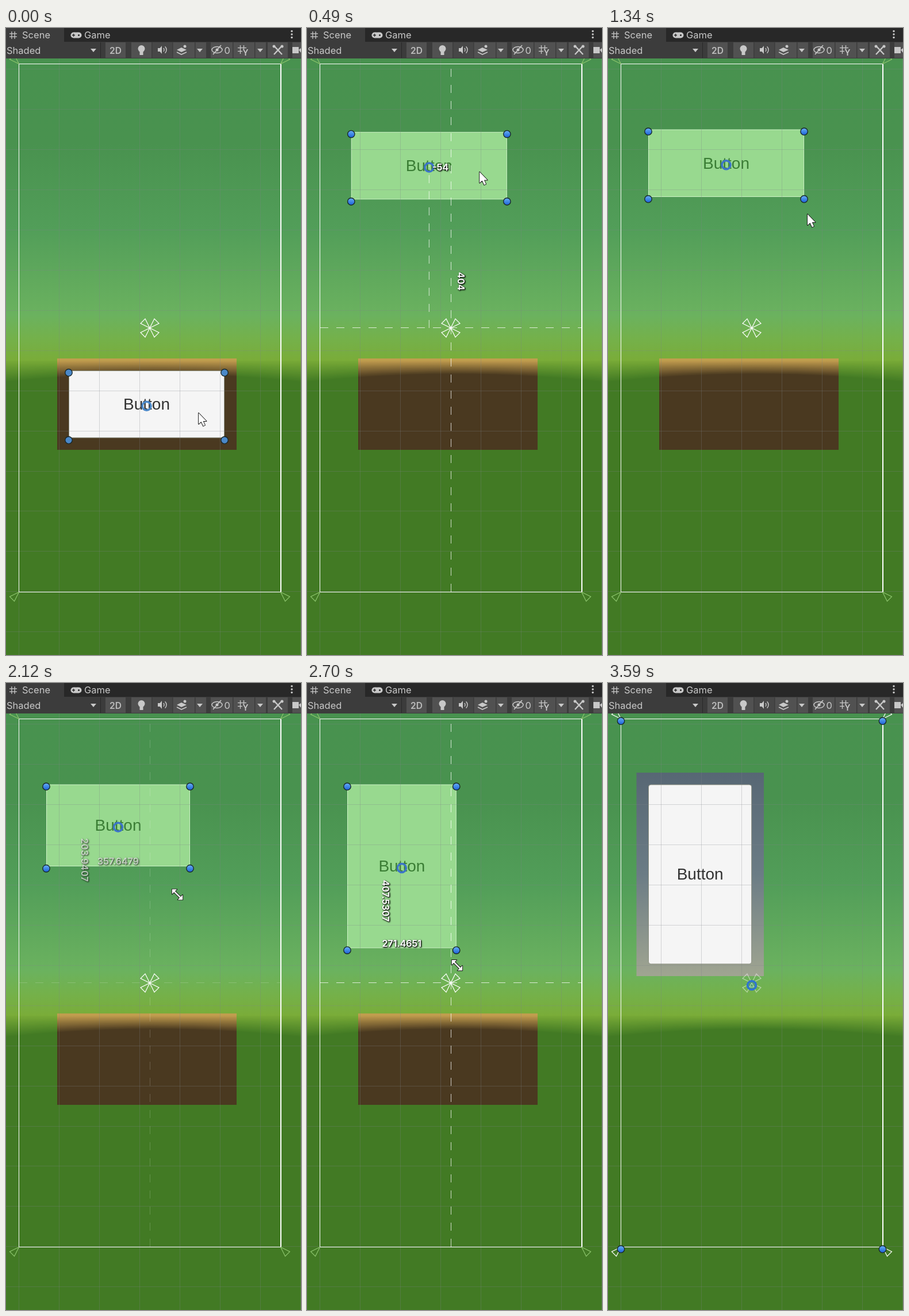
An HTML page with a canvas for the animation above (3900 ms loop, 513 by 1091 pixels).

```html
<!DOCTYPE html>
<html>
<head>
<meta charset="utf-8">
<style>
html, body { margin: 0; width: 100%; height: 100%; overflow: hidden; background: #427a24; }
canvas { display: block; }
</style>
</head>
<body>
<canvas id="stage" width="513" height="1091"></canvas>
<script>
const g = document.getElementById('stage').getContext('2d');
const LOOP = 3900, UNIT = 0.699, CX = 250, CY = 522;
const DROP = 1500, DESELECT = 3430, RELEASE = 3590;
const FRAME = { x: 22.5, y: 62.5, w: 455, h: 919 };
const UI = 'Inter, sans-serif', INK = '#c8c8c8', KEY = '#515151';
const SIDES = [-1, 1];

// Resize drag and pointer route: [time, x, y]
const sizes = [[1980, 387.8, 168], [2120, 357.6479, 203.9407], [2460, 293.7151, 345.7917], [3000, 257.81, 447.6847]];
const route = [[700, 296, 250], [1340, 347, 324], [1980, 347, 322], [2120, 298, 368],
  [2460, 271, 444], [2950, 256, 518], [3030, 256, 518], [3140, 393, 430], [3400, 470, -30]];

const mix = (a, b, k) => a + (b - a) * k;
const ramp = (t, a, b) => Math.min(1, Math.max(0, (t - a) / (b - a)));
const ease = (t, a, b) => { const k = ramp(t, a, b); return k * k * (3 - 2 * k); };

// Monotone cubic curve through the key points
function along(keys, t) {
  const last = keys.length - 1;
  if (t <= keys[0][0]) return keys[0].slice(1);
  if (t >= keys[last][0]) return keys[last].slice(1);
  const i = keys.findIndex(k => k[0] > t) - 1;
  const slope = (n, c) => (keys[n + 1][c] - keys[n][c]) / (keys[n + 1][0] - keys[n][0]);
  const tangent = (n, c) => {
    if (n === 0 || n === last) return 0;
    const a = slope(n - 1, c), b = slope(n, c);
    return a * b > 0 ? 2 * a * b / (a + b) : 0;
  };
  const d = keys[i + 1][0] - keys[i][0], u = (t - keys[i][0]) / d, v = 1 - u;
  return [1, 2].map(c => mix(keys[i][c], keys[i + 1][c], u * u * (3 - 2 * u)) +
    u * v * d * (v * tangent(i, c) - u * tangent(i + 1, c)));
}

const buttonPos = t => [mix(109, 70, ease(t, 20, 660)), mix(596, 176.5, ease(t, 20, 520))];

function pointer(t) {
  if (t >= 700) return along(route, t);
  const [x, y] = buttonPos(t < 20 ? 0 : t + 40);
  return [x + 226, y + 74];
}

const guideAlpha = t => ramp(t, 20, 250) - ramp(t, 800, 1050) + ramp(t, 2010, 2240) - ramp(t, 3030, 3250);

function box(x, y, w, h, fill) {
  g.fillStyle = fill;
  g.fillRect(x, y, w, h);
}

function trace(points) {
  g.beginPath();
  for (let i = 0; i < points.length; i += 2) g.lineTo(points[i], points[i + 1]);
}

function line(points, color, width = 1) {
  trace(points);
  g.strokeStyle = color;
  g.lineWidth = width;
  g.stroke();
}

function shape(points, fill) {
  trace(points);
  g.fillStyle = fill;
  g.fill();
}

function disc(x, y, r, fill, stroke, width = 1, span = Math.PI) {
  g.beginPath();
  g.arc(x, y, r, -span, span);
  if (fill) { g.fillStyle = fill; g.fill(); }
  if (stroke) { g.strokeStyle = stroke; g.lineWidth = width; g.stroke(); }
}

function text(s, x, y, color = INK, align = 'left', font = '16.5px ' + UI) {
  g.font = font;
  g.fillStyle = color;
  g.textAlign = align;
  g.fillText(s, x, y);
}

function gradient(y0, y1, ...colors) {
  const grad = g.createLinearGradient(0, y0, 0, y1);
  colors.forEach((c, i) => grad.addColorStop(i / (colors.length - 1), c));
  return grad;
}

// Curved bands that darken from the horizon into flat ground
function horizon(from, to) {
  for (let i = 0; i <= 14; i++) {
    const k = i / 14, edge = 579 + 36 * k, mid = 579 + 9 * k;
    g.fillStyle = `rgb(${from.map((c, n) => Math.round(mix(c, to[n], k)))})`;
    g.beginPath();
    g.moveTo(0, edge);
    g.quadraticCurveTo(256, mid, 513, edge);
    g.lineTo(513, 1091);
    g.lineTo(0, 1091);
    g.fill();
  }
}

function backdrop() {
  box(0, 52, 513, 448, gradient(52, 500, '#48924f', '#49924f', '#529e59', '#6bb25f'));
  box(0, 500, 513, 80, gradient(500, 580, '#6bb25f', '#74b14b', '#7aac38'));
  horizon([118, 168, 54], [66, 122, 36]);
}

function panel(moved) {
  if (moved) {
    box(49.5, 156, 221.5, 354, gradient(156, 510, '#576774', '#6b7c85', '#a0a591'));
    return;
  }
  g.save();
  g.beginPath();
  g.rect(89, 575, 312, 159);
  g.clip();
  box(89, 575, 312, 159, '#c09e4e');
  horizon([188, 152, 76], [74, 57, 32]);
  g.restore();
}

function grid() {
  const tint = 'rgba(125,130,135,.3)';
  for (let x = 22; x < 513; x += 70) box(x, 52, 1, 1039, tint);
  for (let y = 71; y < 1091; y += 69.95) box(0, Math.round(y), 513, 1, tint);
}

function handles({ x, y, w, h }, flat) {
  for (const hx of [x, x + w]) for (const hy of [y + 3.7, y + h + 3.7])
    disc(hx, hy, 6.2, flat ? '#4b88c8' : gradient(hy - 6, hy + 6, '#68b0f4', '#1c62d8'), '#18282c', 1.4);
}

function button({ x, y, w, h }, solid) {
  g.beginPath();
  g.roundRect(x + 0.5, y + 0.5, w - 1, h - 1, solid ? 4 : 0);
  g.fillStyle = solid ? '#f5f5f5' : '#98d98f';
  g.fill();
  g.strokeStyle = solid ? '#8b8f80' : '#cdf3c6';
  g.lineWidth = 1;
  g.stroke();
  text('Button', x + w / 2, y + h / 2 + 9.5, solid ? '#323232' : '#3a7d34', 'center',
    '28px "Liberation Sans", Arial, sans-serif');
}

function canvasFrame(selected) {
  const { x, y, w, h } = FRAME;
  g.strokeStyle = '#fff';
  g.lineWidth = 1;
  g.strokeRect(x, y, w, h);
  box(x + w, y, 1.5, h, '#fff');
  // Corner and anchor marks share one wedge
  const wedge = (px, py, sx, sy, tint) =>
    line([px, py, px + 16 * sx, py + 8 * sy, px + 8 * sx, py + 16 * sy, px, py], tint, 1.2);
  for (const sx of SIDES) for (const sy of SIDES) {
    wedge(x + (sx + 1) / 2 * w, y + (sy + 1) / 2 * h, sx, sy, selected ? '#fff' : '#8cc46c');
    wedge(CX, CY, sx, sy, selected ? 'rgba(255,255,255,.5)' : '#fff');
  }
}

function label(s, x, y, upright) {
  g.save();
  g.translate(x, y);
  if (upright) g.rotate(Math.PI / 2);
  g.shadowColor = '#000';
  g.shadowBlur = 2.5;
  g.shadowOffsetX = g.shadowOffsetY = 1;
  for (let i = 0; i < 2; i++) text(s, 0, 5.7, '#fff', 'center', '600 16px ' + UI);
  g.restore();
}

function guides(alpha, dragging, { x, y, w, h }, size) {
  const mx = x + w / 2, my = y + h / 2, dash = 'rgba(255,255,255,.75)';
  g.globalAlpha = alpha * alpha;
  g.setLineDash([14, 14]);
  line([CX + 0.5, 981, CX + 0.5, 63], dash);
  line([23, CY - 0.5, 477, CY - 0.5], dash);
  if (dragging) line([mx, CY, mx, my], dash);
  g.setLineDash([]);
  g.globalAlpha = alpha;
  if (dragging) {
    label(Math.round((mx - 250.3) / UNIT), (mx + CX) / 2 + 1, my + 3);
    label(Math.floor((CY - my) / UNIT), CX + 18, (my + CY) / 2 + 60, true);
  } else {
    const [across, down] = size.map(v => +v.toFixed(4));
    label(across, mx, y + h - 8.5);
    label(down, 137, my + 60, true);
  }
  g.globalAlpha = 1;
}

function cursor(x, y, resizing) {
  g.save();
  g.translate(x, y);
  g.lineJoin = 'round';
  if (resizing) g.rotate(Math.PI / 4);
  const outline = resizing
    ? SIDES.flatMap(s => [-13 * s, 0, -7 * s, -6 * s, -7 * s, -1.3 * s, 7 * s, -1.3 * s, 7 * s, -6 * s])
    : [0, 0, 0, 19, 4.5, 15, 8, 22.5, 11, 21, 7.8, 14, 13.5, 14];
  trace(outline);
  g.closePath();
  g.strokeStyle = '#111';
  g.lineWidth = 1.8;
  g.stroke();
  shape(outline, '#fff');
  g.restore();
}

function caret(x) {
  shape([x - 5, 36, x + 5, 36, x, 42], INK);
}

function hash(x, y, s) {
  for (const d of [s * 0.3, s * 0.7]) {
    line([x + d, y, x + d, y + s], INK, 1.3);
    line([x, y + d, x + s, y + d], INK, 1.3);
  }
}

function tabs() {
  box(0, 0, 513, 53, '#3c3c3c');
  box(101, 0, 412, 24, '#282828');
  hash(6, 6, 13);
  text('Scene', 28, 17.5);
  text('Game', 136, 17.5);
  line([118, 12.5, 126, 12.5], INK, 10);
  for (const s of SIDES) disc(122 + 4.5 * s, 12.5, 5, INK);
  line([115, 12.5, 120, 12.5], '#282828', 1.4);
  line([117.5, 10, 117.5, 15], '#282828', 1.4);
  disc(126.5, 12.5, 1.5, '#282828');
  for (let i = -1; i <= 1; i++) disc(497, 11 + 5.5 * i, 1.7, INK);
}

function tools() {
  text('Shaded', 1, 44.5);
  caret(152);
  box(164, 25, 1, 27, '#282828');
  box(173, 25, 35, 27, KEY);
  text('2D', 190.5, 44.5, '#bcbcbc', 'center', '600 15.5px ' + UI);

  box(218, 25, 272, 27, KEY);
  box(254, 25, 35, 27, '#474747');
  for (const x of [253, 289, 328, 394, 432]) box(x, 25, 1.5, 27, '#3c3c3c');
  box(348, 25, 8, 27, '#3c3c3c');
  box(452, 25, 3, 27, '#3c3c3c');
  box(498, 25, 15, 27, KEY);
  // Light bulb
  disc(235.5, 36, 6, INK);
  box(232.5, 40, 6, 7, INK);
  // Speaker
  box(264, 35, 4, 6, INK);
  shape([265, 38, 271, 31, 271, 45], INK);
  for (const r of [4, 8]) disc(271, 38, r, null, INK, 1.5, 0.8);
  // Layers with a sparkle
  shape([297, 38, 305, 34, 314, 38, 305, 42], INK);
  line([297, 42, 305, 46, 314, 42], INK, 1.7);
  disc(311, 32, 2.5, INK);
  caret(337);
  // Crossed eye
  g.beginPath();
  g.ellipse(367, 38, 9, 5.5, 0, 0, 7);
  g.strokeStyle = INK;
  g.lineWidth = 1.5;
  g.stroke();
  disc(367, 38, 2.5, INK);
  line([360, 46, 374, 30], INK, 1.6);
  text('0', 379.5, 44.5);
  // Grid axis
  hash(403, 30, 15);
  box(411, 37, 11, 11, KEY);
  text('Y', 416.5, 48, INK, 'center', '600 14px ' + UI);
  caret(442);
  // Crossed tools and camera
  for (const s of SIDES) {
    line([473 - 7 * s, 31, 473 + 7 * s, 46], INK, 2.4);
    disc(473 + 7 * s, 32, 2.5, INK);
  }
  box(498, 33, 11, 11, INK);
  shape([509, 38, 513, 35, 513, 43], INK);
}

function draw(t) {
  const moved = t >= RELEASE, solid = t < 20 || moved;
  const [x, y] = buttonPos(t), size = along(sizes, t), [w, h] = size.map(v => v * UNIT);
  const rect = { x, y, w, h }, alpha = guideAlpha(t);
  backdrop();
  panel(moved);
  button(rect, solid);
  grid();
  canvasFrame(t >= DESELECT);
  if (t < DESELECT) {
    disc(x + w / 2, y + h / 2 + 3, 7.5, null, solid ? '#4b88c8' : '#3c74c8', 3.5);
    handles(rect, solid);
    if (alpha > 0) guides(alpha, t < DROP, rect, size);
  } else {
    handles(FRAME);
    disc(CX, CY + 4, 7.5, '#55a070', '#2f74d0', 3.5);
    line([CX - 4, CY + 7, CX, CY, CX + 4, CY + 7, CX - 4, CY + 7], '#c4e6c0');
  }
  if (t < 3400) cursor(...pointer(t), t >= DROP && t < 3050);
  tabs();
  tools();
}

// The picture advances in steps of 10 ms
const start = performance.now();
function tick() {
  draw(Math.floor((performance.now() - start) % LOOP / 10) * 10);
  requestAnimationFrame(tick);
}
tick();
</script>
</body>
</html>
```
